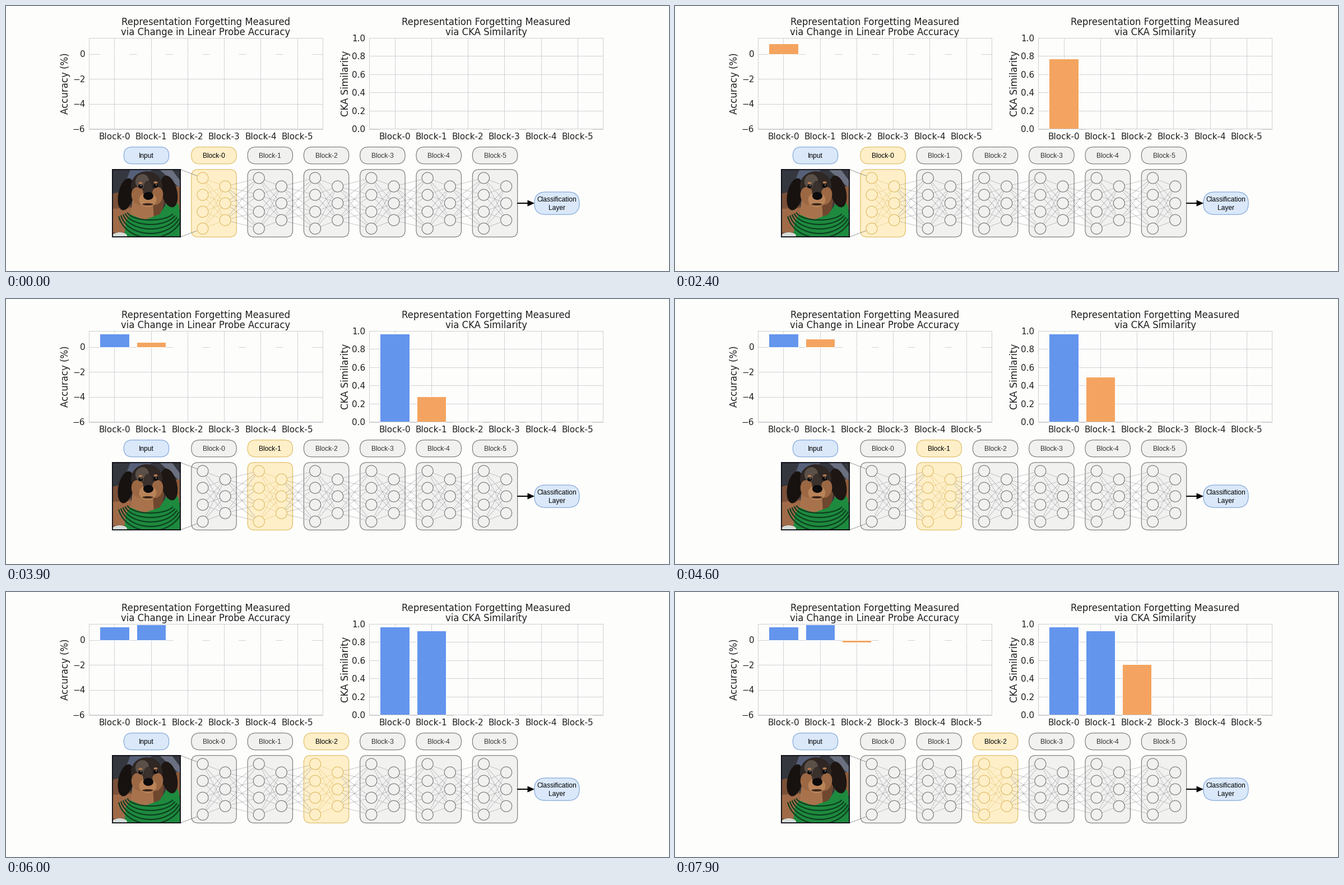
Animation of 1183x473 px, one loop 8 s. Source, as a matplotlib script:

```python
import numpy as np
import matplotlib.pyplot as plt
from matplotlib.animation import FuncAnimation
from matplotlib.collections import LineCollection
from matplotlib.patches import Circle, Ellipse, FancyBboxPatch, Polygon, Rectangle

W, H, DPI = 1183, 473, 100
PX = 72 / DPI
FRAMES, STEP_MS = 80, 100
GROW = 30  # frames each block's bars take to grow

BG = "#fdfdfc"
GRID = "#d2d2d6"
INK = "#1f1f1f"
ORANGE, BLUE = "#f4a460", "#6495ed"
IDLE = dict(fill="#f1f1f0", line="#747474", dots="#85858c", text="#333333")
ACTIVE = dict(fill="#feefc9", line="#dfba5c", dots="#dfba5c", text="#000000")

ACC = [1.04, 1.23, -0.3, 0, 0, 0]
CKA = [0.967, 0.926, 0.876, 0, 0, 0]
PITCH, BAR_W = 65.25, 52.2
TOP, BOTTOM = 57, 219.5

plt.rcParams["font.family"] = "DejaVu Sans"
fig = plt.figure(figsize=(W / DPI, H / DPI), dpi=DPI, facecolor=BG)
ax = fig.add_axes([0, 0, 1, 1])
ax.set_xlim(0, W)
ax.set_ylim(H, 0)
ax.axis("off")


def line(xs, ys, color, width=1.0, z=1, **kw):
    ax.plot(xs, ys, color=color, lw=width * PX, zorder=z, **kw)


def label(x, y, s, size, color=INK, ha="center", va="baseline", **kw):
    return ax.text(x, y, s, fontsize=size * PX, color=color, ha=ha, va=va,
                   zorder=8, **kw)


def small(x, y, s, color="black"):
    return label(x, y + 4.2, s, 12, color, family="Liberation Sans")


def rounded(x, y, w, h, r, fill, edge):
    box = FancyBboxPatch((x, y), w, h, fc=fill, ec=edge, lw=1.1 * PX, zorder=3,
                         boxstyle=f"round,pad=0,rounding_size={r}")
    ax.add_patch(box)
    return box


class Chart:
    """Bar chart laid out in stage pixels."""

    def __init__(self, left, title, ylabel, values, lo, hi, ticks):
        self.values, self.lo, self.hi = values, lo, hi
        right, mid = left + 416.5, left + 208.3
        self.zero = self.y(0)
        self.bars = []
        for i in range(6):
            cx = left + 45.2 + PITCH * i
            line([cx, cx], [TOP, BOTTOM], GRID)
            label(cx, 237.6, f"Block-{i}", 15.2)
            bar = Rectangle((cx - BAR_W / 2, self.zero), BAR_W, 0, fc=BLUE,
                            ec=BG, lw=PX, zorder=2)
            self.bars.append(ax.add_patch(bar))
        for value, text in ticks:
            y = self.y(value)
            line([left, right], [y, y], GRID)
            label(left - 7, y + 5.6, text, 15.2, ha="right")
        ax.add_patch(Rectangle((left, TOP), right - left, BOTTOM - TOP,
                               fc="none", ec="#cfcfcf", lw=PX, zorder=4))
        for row, text in enumerate(title):
            label(mid, 34 + 18 * row, text, 16.5)
        label(left - 37.7, 138.5, ylabel, 16.6, rotation=90,
              rotation_mode="anchor")

    def y(self, value):
        return BOTTOM - (value - self.lo) / (self.hi - self.lo) * (BOTTOM - TOP)

    def update(self, active, part):
        for i, bar in enumerate(self.bars):
            share = 1 if i < active else part if i == active else 0
            bar.set_height(self.y(self.values[i] * share) - self.zero)
            bar.set_facecolor(BLUE if i < active else ORANGE)


def link(a, b, ra=10.0, rb=10.0):
    """Segment between two circles, trimmed to their rims."""
    a, b = np.array(a, float), np.array(b, float)
    u = (b - a) / np.hypot(*(b - a))
    return [a + ra * u, b - rb * u]


def dotted(segments, color, z):
    lines = LineCollection(segments, colors=color, lw=1.0 * PX, zorder=z,
                           linestyles=[(0, (1.2, 1.6))])
    ax.add_collection(lines)
    return lines


def left_nodes(i):
    return [(351 + 100.3 * i, 307 + 30.1 * k) for k in range(4)]


def right_nodes(i):
    return [(391.1 + 100.3 * i, 322 + 30.1 * k) for k in range(3)]


class Block:
    def __init__(self, i):
        x = 330.8 + 100.3 * i
        self.boxes = [rounded(x, 251.7, 80.4, 30.1, 15, "w", "k"),
                      rounded(x, 291.8, 80.4, 120.5, 12, "w", "k")]
        self.nodes = [ax.add_patch(Circle(c, 10, fc="none", lw=1.1 * PX, zorder=5))
                      for c in left_nodes(i) + right_nodes(i)]
        self.links = dotted([link(a, b) for a in left_nodes(i)
                             for b in right_nodes(i)], "k", 4)
        self.text = small(x + 40.2, 266.3, f"Block-{i}")

    def paint(self, style):
        for box in self.boxes:
            box.set_facecolor(style["fill"])
            box.set_edgecolor(style["line"])
        for node in self.nodes:
            node.set_edgecolor(style["line"])
        self.links.set_color(style["dots"])
        self.text.set_color(style["text"])


def draw_photo():
    frame = Rectangle((190.5, 292), 120.5, 120.3, fc="#35373f", ec="#111118",
                      lw=1.8 * PX, zorder=6)
    ax.add_patch(frame)

    def add(shape, color, z):
        shape.set(facecolor=color, edgecolor="none", zorder=z)
        ax.add_patch(shape)
        shape.set_clip_path(frame)

    def poly(color, *points, z=3.2):
        add(Polygon(points), color, z)

    def oval(color, x, y, w, h, angle=0, z=3.5):
        add(Ellipse((x, y), w, h, angle=angle), color, z)

    frame.set_zorder(3)
    # backdrop
    poly("#566078", (222, 292), (262, 292), (240, 306), (212, 318))
    poly("#7b5038", (190, 335), (212, 330), (228, 372), (216, 412), (190, 412))
    poly("#a06a48", (190, 362), (224, 360), (216, 404), (190, 404))
    poly("#6a7080", (274, 292), (296, 292), (311, 312), (311, 326))
    poly("#8d5c3c", (286, 322), (311, 322), (311, 364), (284, 364))
    oval("#d5dcd8", 203, 410, 26, 12)
    # knitted scarf
    green = "#1d8a3e"
    poly(green, (211, 412), (214, 384), (222, 372), (246, 382), (274, 372),
         (288, 350), (300, 344), (308, 356), (311, 374), (311, 412), z=3.4)
    t = np.linspace(0.12 * np.pi, 0.93 * np.pi, 30)
    for k in range(5):
        stripe, = ax.plot(258 + (42 + 4 * k) * np.cos(t),
                          366 + (16 + 8 * k) * np.sin(t),
                          color="#0d3f20", lw=2.2 * PX, zorder=3.45)
        stripe.set_clip_path(frame)
    # dog
    poly("#a8734c", (226, 345), (280, 345), (277, 372), (256, 385), (232, 380),
         (222, 372))
    poly("#6f472f", (262, 350), (284, 340), (278, 372), (264, 380))
    oval("#17120f", 214, 336, 27, 58, 12)
    oval("#1d1613", 291, 331, 28, 58, -14)
    oval("#2f2724", 251, 321, 56, 52)
    oval("#5b5048", 243, 313, 24, 26, 18, z=3.6)
    oval("#9c6844", 236, 339, 24, 32, -14, z=3.6)
    oval("#9c6844", 269, 339, 22, 32, 14, z=3.6)
    oval("#b98358", 253, 346, 31, 26, z=3.65)
    oval("#3a302c", 253, 329, 17, 34, z=3.7)
    oval("#0d0b0c", 254, 339, 18, 14, z=3.8)
    oval("#3b251b", 253, 354, 19, 4, z=3.8)
    for x, y in ((240, 322), (267, 321)):
        oval("#b27a50", x, y - 6, 7, 4, z=3.7)
        oval("#0b0909", x, y, 8, 7, z=3.8)
        oval("#c8ccd2", x + 1, y - 1.5, 1.8, 1.8, z=3.9)
    border = Rectangle((190.5, 292), 120.5, 120.3, fc="none", ec="#111118",
                       lw=1.8 * PX, zorder=6)
    ax.add_patch(border)


charts = [
    Chart(148.3, ["Representation Forgetting Measured",
                  "via Change in Linear Probe Accuracy"],
          "Accuracy (%)", ACC, -6, 1.28,
          [(0, "0"), (-2, "\u22122"), (-4, "\u22124"), (-6, "\u22126")]),
    Chart(648.4, ["Representation Forgetting Measured", "via CKA Similarity"],
          "CKA Similarity", CKA, 0, 1,
          [(k / 5, f"{k / 5:.1f}") for k in range(6)]),
]

blocks = [Block(i) for i in range(6)]
dotted([link(a, b) for i in range(5) for a in right_nodes(i)
        for b in left_nodes(i + 1)], IDLE["dots"], 4)
dotted([link((312, 292), left_nodes(0)[0], ra=0),
        link((312, 412), left_nodes(0)[3], ra=0)], "#222222", 4)

PILL = ("#dae8fa", "#7ba3d6")
rounded(210.3, 251.7, 80.4, 30.1, 15, *PILL)
small(250.4, 266.3, "Input")
rounded(942.7, 332, 80.4, 40.2, 20, *PILL)
small(982.8, 345, "Classification")
small(982.8, 359.4, "Layer")
line([913, 933], [352, 352], "black", 2, 5)
ax.add_patch(Polygon([(930.5, 346.4), (943, 352), (930.5, 357.6)], fc="black",
                     ec="none", zorder=5))
draw_photo()


def update(frame):
    active, step = divmod(frame, GROW)
    for chart in charts:
        chart.update(active, step / GROW)
    for i, block in enumerate(blocks):
        block.paint(ACTIVE if i == active else IDLE)
    return []


anim = FuncAnimation(fig, update, frames=FRAMES, interval=STEP_MS,
                     init_func=lambda: update(0), repeat=True, repeat_delay=0)
plt.show()
```
